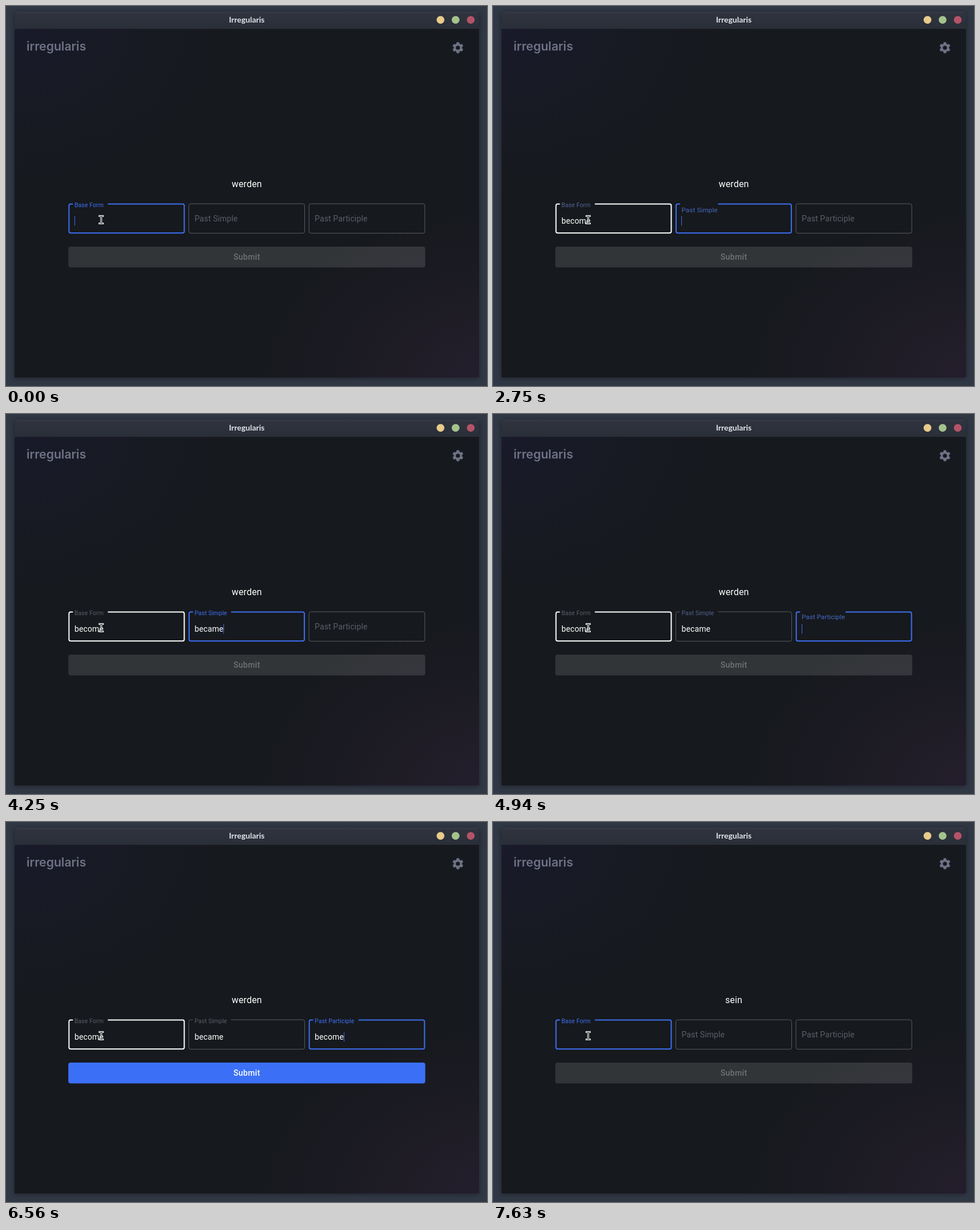
Animation, 843 px wide and 665 px high, one loop 8 s. Source, as an HTML page:

```html
<!DOCTYPE html>
<html lang="en">
<head>
<meta charset="utf-8">
<title>Irregularis</title>
<style>
  html, body { margin: 0; width: 100%; height: 100%; overflow: hidden; background: #303845; }
  .window {
    position: absolute; left: 15px; top: 10px; width: 814px; height: 640px;
    border-radius: 4px 4px 0 0; overflow: hidden;
    box-shadow: 0 1px 9px rgba(0, 0, 0, .42);
  }
  .bar {
    height: 30px; box-sizing: border-box; border-top: 1px solid #3b404c;
    background: linear-gradient(#30343f, #2a2e38);
  }
  .page {
    height: 610px;
    background:
      radial-gradient(ellipse 380px 285px at 0 0, #191a2a, rgba(25, 26, 42, 0)),
      radial-gradient(ellipse 390px 292px at 100% 100%, #241e2c, rgba(36, 30, 44, 0)),
      #16191d;
  }
  svg { position: absolute; left: 0; top: 0; display: block; }
  text { font-family: Roboto, sans-serif; font-size: 14px; fill: #fff; white-space: pre; }
  .mid { text-anchor: middle; }
  .body { letter-spacing: .00938em; }
  .title { font: 700 14px Lato, sans-serif; fill: #e2e5ec; }
  .brand { font: 600 21.2px Inter, sans-serif; fill: #6f7285; }
  .word { font-size: 16px; }
  .submit { font-weight: 500; letter-spacing: .02857em; }
</style>
</head>
<body>
<div class="window"><div class="bar"></div><div class="page"></div></div>
<svg id="stage" width="843" height="665" viewBox="0 0 843 665">
  <text class="title mid" x="422" y="28.5">Irregularis</text>
  <circle cx="761.5" cy="24.3" r="6.8" fill="#e9cb8b"/>
  <circle cx="788" cy="24.3" r="6.8" fill="#a4c38b"/>
  <circle cx="814.5" cy="24.3" r="6.8" fill="#b35367"/>
  <text class="brand" x="36" y="77.5">irregularis</text>
  <g id="gear" transform="translate(792 73)" fill="#6f7285" stroke="#6f7285"></g>
  <text id="word" class="word body mid" x="422" y="316.8"></text>
  <g id="fields"></g>
  <rect id="button" x="109.2" y="421" width="625.6" height="36.6" rx="4"/>
  <text id="submit" class="submit mid" x="422.2" y="444">Submit</text>
  <rect id="caret" y="368" width="1" height="16.4" fill="#3b6ef2"/>
  <g fill="none" stroke-linecap="square">
    <path id="beam" d="M163.9 367.6h1.6q1.3 0 1.3 1.2q0-1.2 1.3-1.2h1.6M166.8 369v10M163.9 380.4h1.6q1.3 0 1.3-1.2q0 1.2 1.3 1.2h1.6" stroke="#fff" stroke-width="3"/>
    <use href="#beam" style="display:none"/>
    <path d="M164.2 367.6h1.4q1.2.1 1.2 1.2q0-1.1 1.2-1.2h1.4M166.8 369v10M164.2 380.4h1.4q1.2-.1 1.2-1.2q0 1.1 1.2 1.2h1.4" stroke="#15171a" stroke-width="1"/>
  </g>
</svg>
<script>
const LOOP = 8000, RESET = 7000, SETTLE = 7015;
const TOP = 345.6, WIDTH = 204, HEIGHT = 52.6;
const BLUE = [61, 111, 244], GRAY = [91, 94, 101];

// toggles: moments at which a value flips between 0 and 1
const FIELDS = [
  { label: 'Base Form', answer: 'become', left: 109.4,
    keys: [690, 880, 1560, 1810, 2000, 2190],
    raised: { first: 1, toggles: [] }, focus: { first: 1, toggles: [2690, SETTLE] } },
  { label: 'Past Simple', answer: 'became', left: 319.9,
    keys: [3190, 3440, 3750, 3880, 4130, 4250],
    raised: { first: 0, toggles: [2690, SETTLE] }, focus: { first: 0, toggles: [2690, 4870] } },
  { label: 'Past Participle', answer: 'become', left: 530.5,
    keys: [5560, 5750, 6060, 6250, 6440, 6560],
    raised: { first: 0, toggles: [4870, SETTLE] }, focus: { first: 0, toggles: [4870, SETTLE] } }
];
const CARET_ON = [[0, 500], [690, 1440], [1560, 2630], [2690, 3130], [3190, 4810], [4870, 5380], [5560, 7630]];

const $ = id => document.getElementById(id);

function add(parent, tag, attrs) {
  const el = document.createElementNS('http://www.w3.org/2000/svg', tag);
  for (const k in attrs) el.setAttribute(k, attrs[k]);
  parent.append(el);
  return el;
}

// cubic-bezier(0, 0, .2, 1)
function ease(x) {
  if (x <= 0) return 0;
  if (x >= 1) return 1;
  let lo = 0, hi = 1;
  for (let i = 0; i < 24; i++) {
    const s = (lo + hi) / 2;
    if (.6 * s * s + .4 * s * s * s < x) lo = s; else hi = s;
  }
  return 3 * lo * lo - 2 * lo * lo * lo;
}

function level({ first, toggles }, t) {
  const past = toggles.filter(k => k <= t);
  const to = (first + past.length) % 2;
  if (!past.length) return to;
  const p = ease((t - past[past.length - 1]) / 200);
  return to ? p : 1 - p;
}

const mix = (a, b, p) => `rgb(${a.map((v, i) => Math.round(v + (b[i] - v) * p))})`;

function outline(left, bw, gap) {
  const h = bw / 2, r = 4 - h;
  const x0 = left + h, x1 = left + WIDTH - h, y0 = TOP + h, y1 = TOP + HEIGHT - h;
  const start = left + 6.9 + h;
  return `M${start + gap} ${y0}H${x1 - r}a${r} ${r} 0 0 1 ${r} ${r}V${y1 - r}a${r} ${r} 0 0 1 ${-r} ${r}` +
    `H${x0 + r}a${r} ${r} 0 0 1 ${-r} ${-r}V${y0 + r}a${r} ${r} 0 0 1 ${r} ${-r}H${start}`;
}

function notch(f, t) {
  if (f.raised.first) return f.notch;
  if (t >= RESET) return 0;
  return Math.min(f.notch, WIDTH * ease((t - f.raised.toggles[0] - 50) / 100));
}

function drawGear() {
  const g = $('gear');
  add(g, 'circle', { r: 5.4, fill: 'none', 'stroke-width': 3.7 });
  for (let a = 0; a < 360; a += 60)
    add(g, 'path', { d: 'M-2.4-6L-2-9.2H2L2.4-6Z', transform: `rotate(${a})`, 'stroke-width': .8, 'stroke-linejoin': 'round' });
}

function build() {
  drawGear();
  for (const f of FIELDS) {
    f.x = f.left + 10.5;
    f.box = add($('fields'), 'path', { fill: 'none' });
    f.tag = add($('fields'), 'text', { class: 'body' });
    f.tag.textContent = f.label;
    f.input = add($('fields'), 'text', { class: 'body', x: f.x, y: 381 });
    f.notch = f.tag.getComputedTextLength() * .75 + 10;
  }
}

function render(t) {
  const active = t < 2690 || t >= RESET ? 0 : t < 4870 ? 1 : 2;

  FIELDS.forEach((f, i) => {
    const focused = i === active, hovered = i === 0;
    const bw = focused || hovered ? 2 : 1;
    f.box.setAttribute('d', outline(f.left, bw, notch(f, t)));
    f.box.setAttribute('stroke-width', bw);
    f.box.setAttribute('stroke', focused ? '#3d6ff2' : hovered ? '#fff' : '#5a5d62');

    const p = level(f.raised, t);
    f.tag.setAttribute('transform', `translate(${f.x} ${377.3 - 25.6 * p}) scale(${1 - .25 * p})`);
    f.tag.style.fill = mix(GRAY, BLUE, level(f.focus, t));

    const typed = t < RESET ? f.keys.filter(k => k <= t).length : 0;
    const value = f.answer.slice(0, typed);
    if (f.input.textContent !== value) f.input.textContent = value;
  });

  const cur = FIELDS[active];
  const advance = cur.input.textContent ? cur.input.getComputedTextLength() : 0;
  $('caret').setAttribute('x', Math.round(cur.x + advance));
  $('caret').style.visibility = CARET_ON.some(([a, b]) => t >= a && t < b) ? 'visible' : 'hidden';

  const ready = t >= 5560 && t < RESET;
  $('button').style.fill = ready ? '#3b70f6' : 'rgba(255,255,255,.12)';
  $('submit').style.fill = ready ? '#fff' : 'rgba(255,255,255,.3)';
  $('word').textContent = t < RESET ? 'werden' : 'sein';
}

build();
const begin = performance.now();
function tick() {
  render((performance.now() - begin) % LOOP);
  requestAnimationFrame(tick);
}
tick();
</script>
</body>
</html>
```
